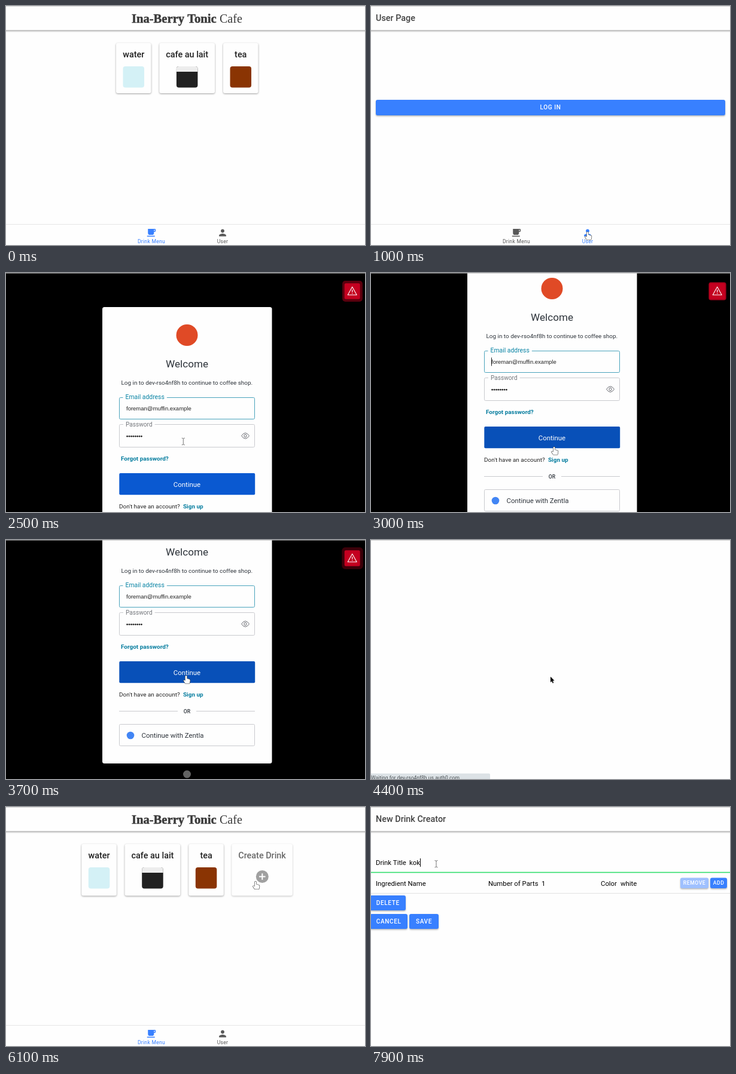
An HTML page with a canvas that plays this animation: 600 px wide and 400 px high, repeating every 8 s.

```html
<!DOCTYPE html>
<html lang="en">
<head>
<meta charset="utf-8">
<title>Cafe ordering demo</title>
<style>
  html, body { margin: 0; width: 100%; height: 100%; overflow: hidden; background: #fff; }
  canvas { display: block; width: 600px; height: 400px; }
</style>
</head>
<body>
<canvas id="stage"></canvas>
<script>
const W = 600, H = 400, LOOP = 8000, STEP = 100;
const BLUE = '#3880ff', TEAL = '#0a84a5', INK = '#2d333a', PAGE = '#fefefe';
const TENANT = 'dev-rso4nf8h', EMAIL = 'foreman@muffin.example';

const canvas = document.getElementById('stage');
const ctx = canvas.getContext('2d');
const dpr = window.devicePixelRatio || 1;
canvas.width = W * dpr;
canvas.height = H * dpr;

const clamp = v => Math.max(0, Math.min(1, v));
const lerp = (a, b, k) => a + (b - a) * k;
const smooth = k => k * k * (3 - 2 * k);
const inside = (x, y, l, t, w, h) => x >= l && x <= l + w && y >= t && y <= t + h;

// Interpolates rows of [time, ...values] with eased segments.
function track(rows, t) {
  const i = rows.findIndex(r => r[0] > t);
  if (i === 0) return rows[0].slice(1);
  if (i < 0) return rows[rows.length - 1].slice(1);
  const a = rows[i - 1], b = rows[i];
  const k = smooth((t - a[0]) / (b[0] - a[0]));
  return a.slice(1).map((v, j) => lerp(v, b[j + 1], k));
}

function rect(x, y, w, h, color) {
  ctx.fillStyle = color;
  ctx.fillRect(x, y, w, h);
}

function box(x, y, w, h, r, fill, stroke) {
  ctx.beginPath();
  ctx.roundRect(x, y, w, h, r);
  if (fill) { ctx.fillStyle = fill; ctx.fill(); }
  if (stroke) { ctx.strokeStyle = stroke; ctx.lineWidth = 1; ctx.stroke(); }
}

function raised(dy, blur, alpha, draw) {
  ctx.save();
  ctx.shadowColor = `rgba(0,0,0,${alpha})`;
  ctx.shadowOffsetY = dy * dpr;
  ctx.shadowBlur = blur * dpr;
  draw();
  ctx.restore();
}

function disc(x, y, r, color) {
  ctx.beginPath();
  ctx.arc(x, y, r, 0, 7);
  ctx.fillStyle = color;
  ctx.fill();
}

// y is the middle of the capital letters.
function text(str, x, y, size, color, { weight = 400, align = 'left', font = 'Roboto, sans-serif', gap = 0 } = {}) {
  ctx.font = `${weight} ${size}px ${font}`;
  ctx.letterSpacing = gap * size + 'px';
  ctx.textAlign = align;
  ctx.fillStyle = color;
  ctx.fillText(str, x, y + size * 0.36);
  ctx.letterSpacing = '0px';
}

function icon(path, x, y, scale, color) {
  ctx.save();
  ctx.translate(x, y);
  ctx.scale(scale, scale);
  ctx.translate(-12, -12);
  ctx.fillStyle = color;
  ctx.fill(path);
  ctx.restore();
}

function button(label, x, y, w, h, { size = 10.1, fill = BLUE } = {}) {
  raised(1.5, 2.5, 0.3, () => box(x, y, w, h, 3, fill));
  text(label, x + w / 2, y + h / 2 - 0.5, size, '#fff', { weight: 500, align: 'center', gap: 0.06 });
}

const CUP = new Path2D('M20 3H4v10c0 2.21 1.79 4 4 4h6c2.21 0 4-1.79 4-4v-3h2c1.11 0 2-.89 2-2V5c0-1.11-.89-2-2-2zm0 5h-2V5h2v3zM2 21h18v-2H2v2z');
const PERSON = new Path2D('M12 12c2.21 0 4-1.79 4-4s-1.79-4-4-4-4 1.79-4 4 1.79 4 4 4zm0 2c-2.67 0-8 1.34-8 4v2h16v-2c0-2.66-5.33-4-8-4z');
const ARROW = new Path2D('M0 .8V10.2L2.2 8.2L3.7 11.7L5.2 11L3.8 7.6H6.6Z');
const HAND = new Path2D('M-1.4 1Q0-1 1.4 1V5L5.3 6Q7 6.5 6.6 9L5.6 13H-1.4L-4.2 8.6Q-4.2 6.4-1.4 8.4Z');

/* Cafe app */

function header(title) {
  raised(1.5, 3, 0.5, () => rect(-10, -10, W + 20, 50.5, PAGE));
  if (title) text(title, 8, 20, 14.4, '#424242', { weight: 500 });
}

function tabs(active) {
  rect(0, 365, W, 35, PAGE);
  rect(0, 365, W, 1, '#e6e6e6');
  const items = [['Drink Menu', 243, CUP, 0.72], ['User', 362, PERSON, 0.74]];
  items.forEach(([label, x, path, scale], i) => {
    const color = i === active ? BLUE : '#595959';
    icon(path, x, 379.5, scale, color);
    text(label, x, 394, 8.64, color, { align: 'center', gap: 0.03 });
  });
}

function card(x, w, h, label, ink = '#212121', alpha = 0.38) {
  raised(1, 3, alpha, () => box(x, 62, w, h, 3, PAGE));
  text(label, x + w / 2, 80.5, 14.4, ink, { weight: 500, align: 'center' });
}

function drink(x, w, h, label, color, top) {
  card(x, w, h, label);
  const sx = x + w / 2 - 17.75;
  box(sx, 101, 35.5, 35.5, 4, color);
  if (top) box(sx, 101, 35.5, 9, [4, 4, 0, 0], top);
}

function menuPage(manager) {
  rect(0, 0, W, H, PAGE);
  header();
  const serif = 'Liberation Serif, serif';
  const name = 'Ina-Berry Tonic';
  text(name, 210, 21, 20.6, '#3a3a3a', { weight: 700, font: serif });
  ctx.strokeStyle = '#3a3a3a';
  ctx.lineWidth = 0.5;
  ctx.strokeText(name, 210, 21 + 20.6 * 0.36);
  text('Cafe', 357, 21, 20, '#3a3a3a', { font: serif });

  const dx = manager ? -57.7 : 0, h = manager ? 86.5 : 84;
  drink(184 + dx, 58.5, h, 'water', '#d4f1f6');
  drink(256.3 + dx, 92.7, h, 'cafe au lait', '#212121', '#ededed');
  drink(363 + dx, 58.5, h, 'tea', '#8a3403');
  if (manager) {
    card(377.3, 101.5, h, 'Create Drink', '#696969', 0.24);
    disc(428.3, 116.5, 10.5, '#a0a0a0');
    rect(423, 115.5, 10.6, 2, '#fff');
    rect(427.3, 111.2, 2, 10.6, '#fff');
  }
  tabs(0);
}

function userPage(loggedIn) {
  rect(0, 0, W, H, PAGE);
  header('User Page');
  button(loggedIn ? 'LOG OUT' : 'LOG IN', 8, 157, 584, 26);
  tabs(1);
}

function creator(t) {
  const k = clamp((t - 6300) / 300);
  const ease = 1 - Math.pow(1 - k, 3);
  const label = (str, x, y) => text(str, x, y, 11.35, '#000');
  ctx.save();
  ctx.globalAlpha = ease;
  ctx.translate(0, 29 * (1 - ease));
  rect(0, 0, W, H, PAGE);
  header('New Drink Creator');

  const typed = 'kok'.slice(0, Math.max(0, Math.floor((t - 7600) / 100)));
  label('Drink Title', 8, 93);
  label(typed, 64, 93);
  if (t >= 7300) {
    rect(64 + ctx.measureText(typed).width, 86, 1, 14, '#000');
    rect(0, 108.7, W, 1.6, '#2fdc6c');
  } else {
    rect(0, 109, W, 1, '#e2e2e2');
  }

  label('Ingredient Name', 8, 127.5);
  label('Number of Parts', 196, 127.5);
  label('1', 285, 127.5);
  label('Color', 384, 127.5);
  label('white', 417, 127.5);
  button('REMOVE', 517, 118.5, 47, 17.5, { size: 8.65, fill: '#9fc0ff' });
  button('ADD', 567, 118.5, 28, 17.5, { size: 8.65 });
  rect(0, 144, W, 1, '#e2e2e2');
  button('DELETE', -1.5, 148, 59.5, 25);
  button('CANCEL', -1.5, 179, 62.5, 25);
  button('SAVE', 64, 179, 49, 25);
  ctx.restore();
}

/* Login page */

function alertBadge(t) {
  const phase = ((t - 1800) % 1000) / 1000;
  const grow = 5 * Math.pow(phase, 0.7);
  if (grow) box(566 - grow, 17 - grow, 26 + 2 * grow, 27 + 2 * grow, 3 + grow / 2, `rgba(200,0,32,${0.98 - 0.75 * phase})`);
  box(565.7, 17.3, 26, 26.4, 2.5, '#c40020');
  ctx.strokeStyle = '#fff';
  ctx.lineWidth = 1.1;
  ctx.lineJoin = 'round';
  ctx.stroke(new Path2D('M578.7 23.2L586.2 36.8H571.2Z'));
  rect(578.1, 28, 1.2, 4.2, '#fff');
  rect(578.1, 33.6, 1.2, 1.3, '#fff');
}

function floatLabel(label, x, y, size, color) {
  ctx.font = `400 ${size}px Roboto, sans-serif`;
  rect(x - 4, y - 5, ctx.measureText(label).width + 8, 12, PAGE);
  text(label, x, y, size, color);
}

function eye(x, y) {
  ctx.strokeStyle = '#65676e';
  ctx.lineWidth = 1;
  ctx.beginPath();
  ctx.moveTo(x - 6.5, y);
  ctx.quadraticCurveTo(x, y - 9.5, x + 6.5, y);
  ctx.quadraticCurveTo(x, y + 9.5, x - 6.5, y);
  ctx.stroke();
  ctx.beginPath();
  ctx.arc(x, y, 2.2, 0, 7);
  ctx.stroke();
}

const scrollAt = t => track([[2700, 0], [3000, 78], [3100, 78], [3500, 132]], t)[0];

function loginPage(t, hover) {
  const small = 9.95, link = '#067d9f', line = '#c9cace';
  rect(0, 0, W, H, '#000');
  ctx.save();
  ctx.translate(0, -scrollAt(t));
  box(161, 57, 283.5, 449, 3.5, PAGE);
  disc(302.5, 104, 18, '#e04a26');
  text('Welcome', 302.5, 152, 17.1, INK, { align: 'center' });
  text(`Log in to ${TENANT} to continue to coffee shop.`, 302.3, 183, small, INK, { align: 'center' });

  const k = smooth(clamp((t - 1800) / 200));
  box(189.5, 208.5, 226, 36, 2, null, '#4aa3bc');
  text(EMAIL, 201, 227, 9.5, '#222', { font: 'Liberation Sans, sans-serif' });
  if ((t - 1800) % 1000 < 500) rect(201, 219.5, 1, 14, '#222');
  floatLabel('Email address', 199.5, lerp(227.5, 207.5, k), 10.4, TEAL);

  box(189.5, 253.5, 226, 38, 2, null, line);
  if (t >= 1900) for (let i = 0; i < 8; i++) disc(202.6 + i * 3.4, 273.3, 1.35, '#222');
  floatLabel('Password', lerp(205.5, 200, k), lerp(272.5, 253, k), lerp(11.5, 10.1, k), '#74777c');
  eye(400, 272.5);

  text('Forgot password?', 192, 310, small, link, { weight: 700 });
  box(189.3, 335, 226.9, 36.3, 2, hover ? '#0850b8' : '#0a59d1');
  text('Continue', 302.5, 353.5, 11.4, '#fff', { align: 'center' });
  text("Don't have an account?", 189, 390, small, '#222');
  text('Sign up', 296, 390, small, link, { weight: 700 });
  rect(189, 418, 98, 1, line);
  rect(318, 418, 98, 1, line);
  text('OR', 302.5, 418.7, 8.6, INK, { weight: 500, align: 'center' });
  box(189.5, 440.5, 226, 36, 2, null, line);
  disc(208, 459, 6.3, '#4285f4');
  text('Continue with Zentla', 226.5, 459, 11.4, INK);
  disc(302.5, 524, 6.5, '#626262');
  ctx.restore();
  alertBadge(t);
}

function statusBar() {
  box(-2, 390.8, 201, 12, [0, 2, 0, 0], '#dce2e6');
  text(`Waiting for ${TENANT}.us.auth0.com...`, 0, 398, 8.55, '#4a5054');
}

/* Pointer */

const POINTER = [
  [300, 400, 200], [800, 362, 378], [1100, 362, 378], [1500, 175, 166],
  [2000, 175, 166], [2600, 306, 291], [3300, 306, 291], [3600, 301, 227],
  [3700, 301, 227], [3800, 300, 228], [4800, 300, 228], [5400, 243, 378],
  [5700, 243, 378], [6000, 417, 124.5], [6700, 417, 124.5], [7200, 109, 95]
];

function pointerKind(scene, x, y, t) {
  if (scene === 'blank') return 'arrow';
  if (scene === 'login') {
    const s = scrollAt(t);
    if (inside(x, y, 189, 335 - s, 227, 37)) return 'hand';
    return inside(x, y, 190, 208 - s, 226, 84) ? 'beam' : 'arrow';
  }
  if (scene === 'creator') return y > 76 && y < 109 ? 'beam' : 'arrow';
  if (y > 366) return 'hand';
  if (scene === 'user') return inside(x, y, 8, 157, 584, 26) ? 'hand' : 'arrow';
  return t > 5000 && inside(x, y, 377, 62, 102, 87) ? 'hand' : 'arrow';
}

function drawPointer(kind, x, y) {
  ctx.save();
  ctx.translate(x, y);
  ctx.lineJoin = 'round';
  if (kind === 'beam') {
    ctx.strokeStyle = '#777';
    ctx.lineWidth = 1;
    ctx.stroke(new Path2D('M-2.5-5.5Q0-5.5 0-4Q0-5.5 2.5-5.5M0-4V4.5M-2.5 6Q0 6 0 4.5Q0 6 2.5 6'));
  } else {
    const hand = kind === 'hand', path = hand ? HAND : ARROW;
    ctx.strokeStyle = hand ? '#333' : '#fff';
    ctx.lineWidth = 1.1;
    ctx.fillStyle = hand ? '#fff' : '#000';
    ctx.stroke(path);
    ctx.fill(path);
  }
  ctx.restore();
}

/* Timeline */

function sceneAt(t) {
  if (t < 900) return 'menu';
  if (t < 1800) return 'user';
  if (t < 4000) return 'login';
  if (t < 4500) return 'blank';
  if (t < 5500) return 'user';
  return t < 6400 ? 'menu' : 'creator';
}

function draw(t) {
  const scene = sceneAt(t);
  const [x, y] = track(POINTER, t);
  const kind = pointerKind(scene, x, y, t);
  ctx.setTransform(dpr, 0, 0, dpr, 0, 0);

  if (scene === 'menu') menuPage(t > 5000);
  else if (scene === 'user') userPage(t > 4000);
  else if (scene === 'login') loginPage(t, kind === 'hand');
  else if (scene === 'blank') rect(0, 0, W, H, PAGE);
  else { menuPage(true); creator(t); }

  if ((t >= 1500 && t < 1800) || (t >= 3800 && t < 4500)) statusBar();
  rect(0, 0, W, 1, 'rgba(190,190,190,0.65)');
  if (t >= 300) drawPointer(kind, x, y);
}

function tick() {
  const t = performance.now() % LOOP;
  draw(Math.floor(t / STEP) * STEP);
  requestAnimationFrame(tick);
}
tick();
</script>
</body>
</html>
```
